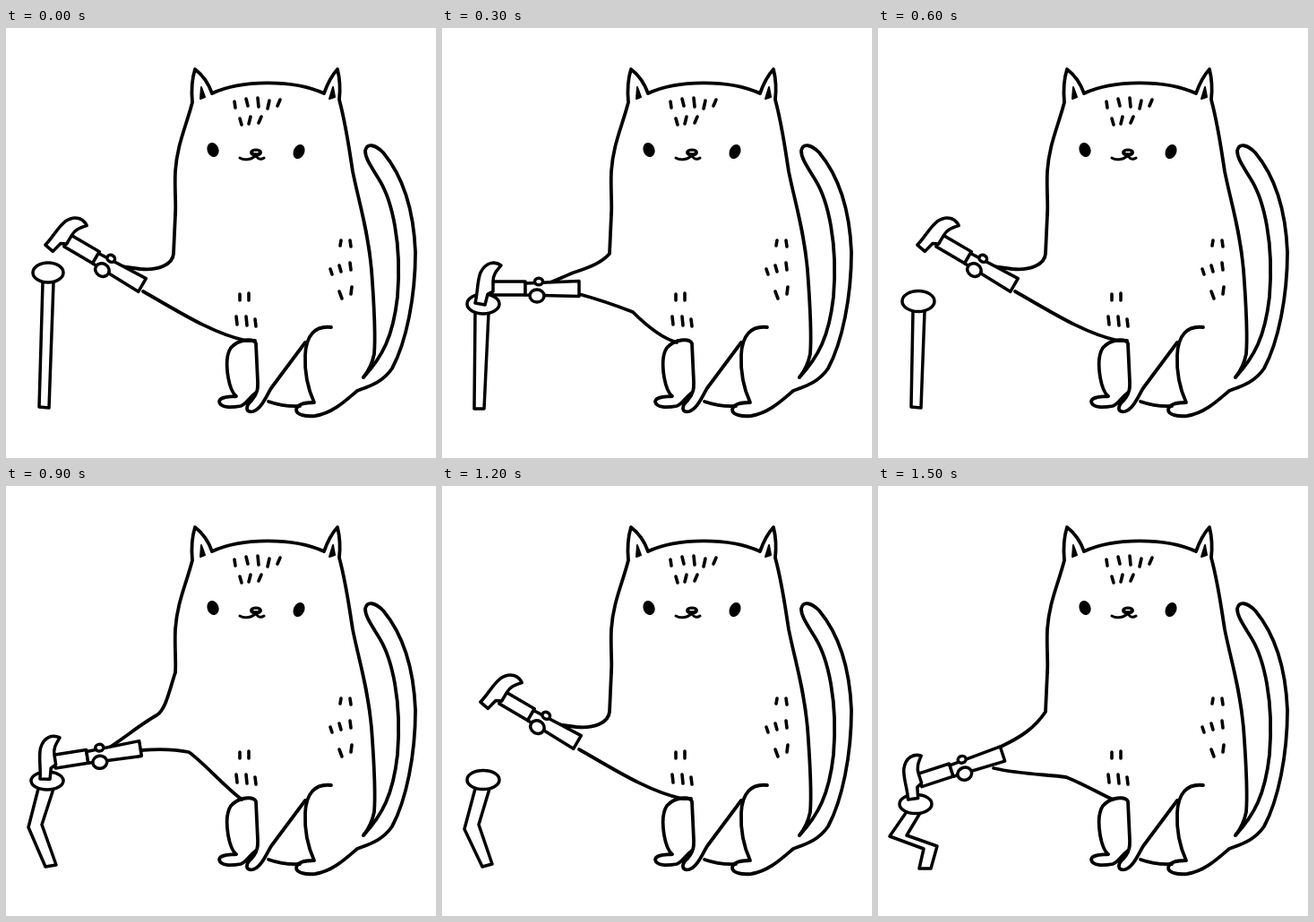
These frames come from a looping animation (480x480 px, 1800 ms). An HTML page:

```html
<!DOCTYPE html>
<html lang="en">
<head>
<meta charset="utf-8">
<title>Cat hammering a nail</title>
<style>
html, body { margin: 0; width: 100%; height: 100%; overflow: hidden; background: #fff; }
svg { display: block; width: 100%; height: 100%; }
</style>
</head>
<body>
<svg viewBox="0 0 480 480" fill="none" stroke="#000" stroke-width="3.8" stroke-linecap="round" stroke-linejoin="round">
  <!-- head and back -->
  <path d="M189 208C190 195 188 180 189 160C191 130 201 110 208 83Q206 62 211 46Q224 56 230 73C262 58 320 57 355 73Q361 56 370 46Q374 62 372 80C380 110 383 135 387 160C394 195 404 225 408 270C411 310 413 340 411 364C408 378 403 385 399 390"/>
  <!-- tail and hind leg -->
  <path d="M399 390C420 367 432 345 437 300C442 240 431 193 417 170C408 155 401 146 401 137C403 128 412 130 421 139C441 163 455 200 457 250C457 300 447 350 431 380C420 396 405 400 392 405C378 417 364 430 345 433C335 434 324 432 324 426C325 420 333 418 344 418C338 405 333 388 334 365C335 343 345 332 363 334"/>
  <!-- front legs and belly -->
  <path d="M334 351L296 402C290 412 285 425 276 428C267 430 267 422 274 416C282 407 281 400 281 395L279 352C276 346 260 347 251 357C245 366 246 378 248 390C250 401 253 408 257 411C250 412 239 411 238 417C239 424 251 424 262 422C268 420 270 414 279 407M293 417Q310 423 328 422"/>
  <!-- ears and face -->
  <g fill="#000">
    <path stroke-width="2" d="M218 66L222 77L217 79ZM365 66L367 77L361 79Z"/>
    <ellipse cx="231" cy="136" rx="4.5" ry="6.3" transform="rotate(-20 231 136)"/>
    <ellipse cx="327" cy="138" rx="4.2" ry="6.5" transform="rotate(24 327 138)"/>
    <ellipse cx="279" cy="139" rx="5.5" ry="3" stroke-width="3"/>
  </g>
  <path stroke-width="3" d="M261 145C266 148 275 147 279 142C281 147 285 147 288 145"/>
  <path stroke="#fff" stroke-width="1.5" d="M277 138.5h4"/>
  <path id="fur" stroke-width="3.6"/>
  <path id="nail" stroke-width="3.5"/>
  <ellipse id="cap" fill="#fff" stroke-width="3.5"/>
  <path id="arm"/>
  <!-- origin at the end of the grip -->
  <g id="hammer" fill="#fff" stroke-width="3.5">
    <path d="M-97 -8L-60 -8V7L-97 7Z"/>
    <path d="M-87 -26C-94 -31 -104 -30 -110 -18C-114 -8 -113 5 -116 16L-105 18L-102 6L-96 3V-8C-96 -16 -92 -20 -87 -26Z"/>
    <path d="M-60 -6L0 -8.5V8.5L-60 7Z"/>
    <ellipse cx="-47" cy="8" rx="8" ry="7"/>
    <ellipse cx="-45" cy="-8" rx="4.5" ry="3.8"/>
  </g>
</svg>
<script>
const $ = id => document.getElementById(id);
const set = (id, attrs) => {
  for (const name in attrs) $(id).setAttribute(name, attrs[name]);
};

// each tuft: x, y, dx, dy
const tufts = [
  [255, 82, 1, 7], [268, 79, 2, 8], [281, 78, 1, 10], [294, 81, -2, 9], [306, 80, -3, 7],
  [261, 101, 2, 7], [273, 99, -2, 8], [285, 99, -3, 7],
  [374, 237, -1, 6], [384, 237, 1, 7], [362, 269, 2, 6], [372, 265, 2, 7], [384, 262, 1, 8],
  [372, 294, 3, 8], [386, 289, -1, 8],
  [261, 297, 0, 7], [271, 296, 0, 8], [257, 322, 1, 9], [268, 322, 1, 10], [278, 325, 1, 8]
];
set('fur', { d: tufts.map(([x, y, dx, dy]) => `M${x} ${y}l${dx} ${dy}`).join('') });

const side = 'M189 208Q188 230 187 252';
const raised = {
  arm: side + 'C186 264 170 271 150 269Q134 267 121 265M153 294C190 315 230 341 268 349H278',
  hammer: [152, 287, 30.4]
};
const poses = [
  { ...raised, cap: [47, 273, 17, 11], nail: 'M41 284L37 423L48 424L53 284' },
  {
    arm: side + 'C178 262 165 267 150 272C138 276 128 282 115 286M153 297C175 303 195 310 213 317C228 332 245 346 262 351',
    hammer: [153, 291, 0], cap: [46, 308, 18, 11], nail: 'M37 319L36 425H47L52 318'
  },
  { ...raised, cap: [45, 305, 18, 11.5], nail: 'M39 317L37 423L48 424L52 317' },
  {
    arm: 'M189 208C182 230 178 250 168 256C150 266 130 283 112 294M150 295C175 293 190 294 204 297C220 308 240 332 263 350',
    hammer: [150, 293, -9], cap: [46, 329, 18, 10], nail: 'M36 338L25 381L44 425L56 423L40 378L53 338'
  },
  {
    ...raised, hammer: [151, 286, 30.4],
    cap: [46, 328, 18, 10.5], nail: 'M37 338L25 383L45 425L56 422L41 378L53 338'
  },
  {
    arm: side + 'C175 270 160 280 137 291M129 315C160 322 190 322 210 325C230 333 245 342 262 350',
    hammer: [139, 299, -18], cap: [42, 355, 18, 10.5], nail: 'M31 365L13 391L51 405L46 427H59L66 402L32 390L47 365'
  }
];

const hold = 300;
let shown;

function draw(now) {
  const pose = poses[Math.floor(now / hold) % poses.length];
  if (pose !== shown) {
    const [cx, cy, rx, ry] = pose.cap;
    const [x, y, angle] = pose.hammer;
    set('nail', { d: pose.nail });
    set('cap', { cx, cy, rx, ry });
    set('arm', { d: pose.arm });
    set('hammer', { transform: `translate(${x} ${y}) rotate(${angle})` });
    shown = pose;
  }
  requestAnimationFrame(t => draw(Math.max(0, t - start)));
}

const start = performance.now();
draw(0);
</script>
</body>
</html>
```
